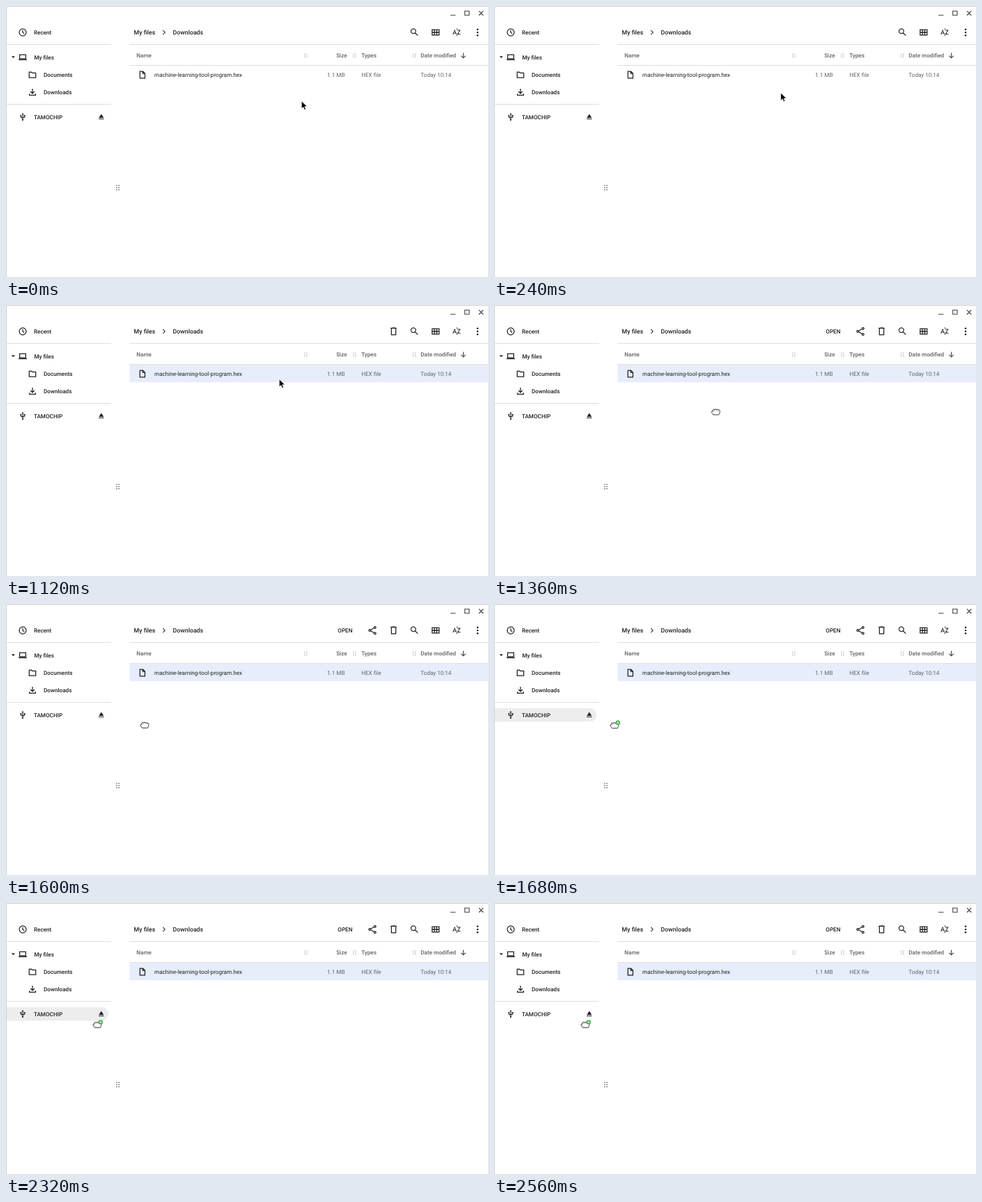
Recreate the animation shown at these times as an HTML page. Size 692 by 390 pixels, loop 3600 ms.

```html
<!DOCTYPE html>
<html lang="en">
<head>
<meta charset="utf-8">
<title>Copying a file to a drive</title>
<style>
  html, body { margin: 0; width: 100%; height: 100%; overflow: hidden; background: #fff; }
  svg { display: block; width: 692px; height: 390px; }
  text { font: 400 8.15px Roboto, sans-serif; fill: #202124; text-rendering: geometricPrecision; white-space: pre; }
  .m { font-weight: 500; }
  .crumb { font-size: 8.76px; }
  .grey { fill: #5f6368; }
  .rule { stroke: #dfdfdf; fill: none; }
  .line { fill: none; stroke: #202124; stroke-width: 2; }
  .solid { fill: #202124; }
  .thin { fill: none; stroke: #3c4043; stroke-width: 1.1; }
</style>
</head>
<body>
<svg id="stage" viewBox="0 0 692 390" xmlns="http://www.w3.org/2000/svg"></svg>
<script>
const LOOP = 3600, STEP = 80;

// Icons sit on a 24-unit grid; the first item tells outline from solid.
const ICONS = {
  clock: ['line', 'M12 4a8 8 0 1 0 .01 0zM12 7.3v5l3.8 2.4'],
  laptop: ['line', 'M5 6.5h14v9.2H5zM2.5 18.3h19'],
  folder: ['line', 'M4.5 6h5l2 2h8v10.5h-15z'],
  download: ['line', 'M12 4v10.5M7.5 10.5l4.5 4.5 4.5-4.5M5 15.5V19h14v-3.5'],
  usb: ['solid', 'M15 7v4h1v2h-3V5h2l-3-4-3 4h2v8H8v-2.1a2.2 2.2 0 1 0-2 0V13a2 2 0 0 0 2 2h3v3a2.2 2.2 0 1 0 2 0v-3h3a2 2 0 0 0 2-2v-2h1V7z'],
  eject: ['solid', 'M5 17h14v2.2H5zM12 5L5.3 15h13.4z'],
  search: ['line', 'M9.5 4a5.5 5.5 0 1 0 .01 0zM13.6 13.6l6.1 6.1'],
  grid: ['line', 'M4 6h16v12H4zM9.33 6v12M14.67 6v12M4 12h16'],
  sort: ['solid', 'M14.9 4.7h-4.7l2.4-2.4zM10.2 19.4h4.7l-2.3 2.3zM6.1 6.3L1.6 17.7h1.9l.9-2.4h5.1l.9 2.4h1.8L7.7 6.3zM5 13.6l1.9-5.1 1.9 5.1zM15.7 16.1h6.1v1.6h-8.5v-1.3l5.9-8.5h-5.9V6.3h8.3v1.2z'],
  trash: ['line', 'M5 5h14M9.5 4h5M7 6v14h10V6'],
  share: ['line', 'M18 3a2.2 2.2 0 1 0 .01 0zM6 9.8a2.2 2.2 0 1 0 .01 0zM18 16.6a2.2 2.2 0 1 0 .01 0zM8 10.9l8-4.6M8 13.1l8 4.6'],
  file: ['line', 'M6.5 4.5h7L18 9v11H6.5zM13 4.5v5h5']
};

const icon = (name, x, y, scale = .626) => {
  const [kind, d] = ICONS[name];
  return `<path class="${kind}" fill-rule="evenodd" d="${d}" transform="translate(${x} ${y}) scale(${scale}) translate(-12 -12)"/>`;
};
const text = (s, x, y, cls = '') => `<text class="${cls}" x="${x}" y="${y}">${s}</text>`;
const path = (cls, d) => `<path class="${cls}" d="${d}"/>`;

// A two-by-three block of dots used as a drag handle.
const handle = (x, y, dx, dy, size, color) => {
  let d = '';
  for (const i of [-1, 1]) for (const j of [-1, 0, 1])
    d += `M${x + i * dx - size / 2} ${y + j * dy - size / 2}h${size}v${size}h${-size}z`;
  return `<path fill="${color}" d="${d}"/>`;
};

const sidebar =
  icon('clock', 24, 38) + text('Recent', 40, 41, 'm') +
  path('solid', 'M7.8 72.2h5.2l-2.6 2.8z') +
  icon('laptop', 24, 73.5) + text('My files', 40.4, 76.5, 'm') +
  icon('folder', 38, 99) + text('Documents', 54, 102, 'm') +
  icon('download', 38, 124) + text('Downloads', 54, 127, 'm') +
  icon('usb', 24, 159.6, .52) + text('TAMOCHIP', 40, 162.5, 'm') +
  icon('eject', 136.8, 159.3, .53) +
  handle(160.5, 261.3, 1.65, 3.1, 1.6, '#777');

const toolbar =
  text('My files', 183.6, 40.5, 'm crumb') + path('thin', 'M225.3 35l3 3-3 3') +
  text('Downloads', 239.6, 40.5, 'm crumb') +
  icon('search', 586.4, 37.8) + icon('grid', 616.8, 38) + icon('sort', 647, 37.7, .56) +
  [33.8, 38, 42.2].map(y => `<circle class="solid" cx="677" cy="${y}" r="1.3"/>`).join('') +
  path('thin', 'M638.2 13.3h7.3M658.7 7.3h6.3v6h-6.3zM679 7.2l6.3 6.3M685.3 7.2L679 13.5');

const table =
  text('Name', 187.3, 74, 'm grey') + text('Size', 474.2, 74, 'm grey') +
  text('Types', 510.2, 74, 'm grey') + text('Date modified', 595.3, 74, 'm grey') +
  [430.4, 500.4, 586].map(x => handle(x, 71.2, 1.5, 2.3, 1, '#8a8a8a')).join('') +
  path('thin', 'M656.6 67.6v7M653.4 71.6l3.2 3.2 3.2-3.2') +
  icon('file', 195.7, 98.8) + text('machine-learning-tool-program.hex', 213, 101.8) +
  text('1.1 MB', 461, 101.8, 'grey') + text('HEX file', 510.2, 101.8, 'grey') +
  text('Today 10:14', 595.3, 101.8, 'grey');

const arrow = `<g id="arrow"><path d="M0 0v11.2l2.6-2.3 1.7 3.8 2-.9-1.7-3.7h3.7z"
  fill="#000" stroke="#fff" stroke-width=".8"/></g>`;
const hand = `<g id="hand" stroke="#222" stroke-width=".9" stroke-linejoin="round">
  <path fill="#fff" d="M-3.6 4.4C-4.5 2.6-6.5 1-6-.2-5.6-1.3-4.5-.9-4-.4V-2.4C-3.8-3.9-2-3.9-1.6-2.8-1.2-4.2 .8-4.2 1-2.9 1.6-3.9 3.2-3.7 3.4-2.4 4.2-3.1 5.9-2.7 5.9-1.2 5.9 1 5.4 2.6 4.3 4.4z"/>
  <path fill="none" stroke-width=".6" d="M-1.6-2.8v1.5M1-2.9v1.5M3.4-2.4v1.3"/>
  <g id="badge" stroke="none"><circle cx="4.9" cy="-3.6" r="3.2" fill="#45b04e"/>
  <path d="M3.2-3.6h3.4M4.9-5.3v3.4" stroke="#fff" stroke-width=".9"/></g></g>`;

const stage = document.getElementById('stage');
stage.innerHTML =
  '<rect id="row" x="177.5" y="85.5" width="514.5" height="25.7" fill="#e7edfb"/>' +
  '<path id="drop" fill="#ededed" d="M0 150h137.6a9.7 9.7 0 0 1 0 19.4H0z"/>' +
  path('rule', 'M0 55.5h151M0 141.5h151M177.5 55.5H692M177.5 85.5H692') +
  '<path d="M.5 390V.5H692" fill="none" stroke="#d0d0d0"/>' +
  sidebar + toolbar + table +
  `<g id="bin">${icon('trash', 556.5, 37.8)}</g>` +
  `<g id="actions">${text('OPEN', 476.3, 40.5, 'm')}${icon('share', 526, 38)}</g>` +
  arrow + hand;

const part = {};
for (const id of ['row', 'drop', 'bin', 'actions', 'arrow', 'hand', 'badge'])
  part[id] = document.getElementById(id);

const show = (id, on) => part[id].setAttribute('visibility', on ? 'visible' : 'hidden');
const place = (id, [x, y]) => part[id].setAttribute('transform', `translate(${x} ${y})`);

// Hand centre at each step of the drag, starting at DRAG ms.
const DRAG = 1280;
const dragPath = [
  [354, 135], [318.4, 153.6], [278, 165], [236, 171.5], [199, 174], [173, 174.4],
  [154, 174.8], [142, 175], [134, 175.2], [134, 175.2], [131, 175]
];

function arrowAt(t) {
  if (t >= 1200) return [386, 113];
  const k = Math.min(1, t / 560);
  const e = k * k * (3 - 2 * k);
  return [424.2 - 32 * e, 136.7 - 30 * e];
}

function draw(now) {
  const t = Math.floor((now % LOOP) / STEP) * STEP;
  const dragging = t >= DRAG;
  show('row', t >= 1120);
  show('bin', t >= 1120);
  show('actions', t >= 1200);
  show('drop', t >= 1680 && t < 2480);
  show('arrow', !dragging);
  show('hand', dragging);
  show('badge', t >= 1680);
  place('arrow', arrowAt(t));
  if (dragging) place('hand', dragPath[Math.min((t - DRAG) / STEP, dragPath.length - 1)]);
}

let start;
function tick(now) {
  start ??= now;
  draw(Math.max(0, now - start));
  requestAnimationFrame(tick);
}
draw(0);
requestAnimationFrame(tick);
</script>
</body>
</html>
```
